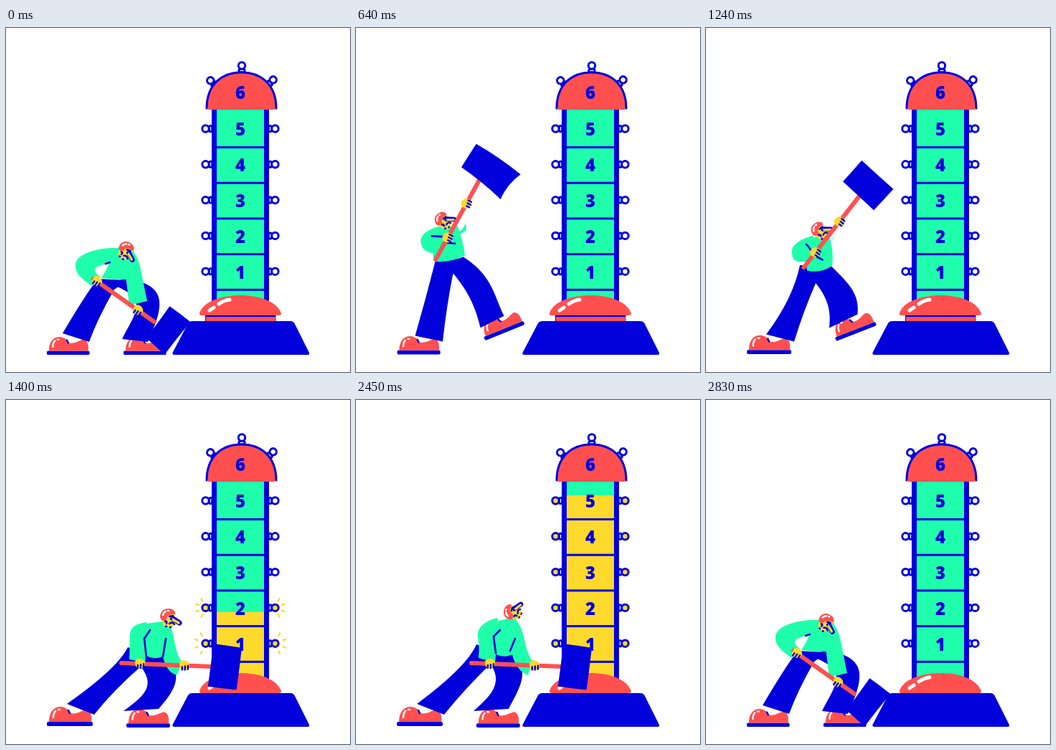
Recreate the animation shown at these times as an HTML page. Size 480 by 480 pixels, loop 2.9 s.

```html
<!DOCTYPE html>
<html lang="en">
<head>
<meta charset="utf-8">
<title>High striker</title>
<style>
  html, body { margin: 0; width: 100%; height: 100%; overflow: hidden; background: #fff; }
  svg { display: block; width: 100%; height: 100%; stroke-linecap: round; stroke-linejoin: round; }
  .b { fill: #0200db; }
  .r { fill: #ff504f; }
  .g { fill: #1fffab; }
  .y { fill: #ffd92b; }
  .line { fill: none; stroke: #0200db; stroke-width: 2.6; }
  .shine { fill: none; stroke: #fff; stroke-width: 2.6; }
  .ray { fill: none; stroke: #ffd92b; stroke-width: 2.2; }
  text { font: 800 24px "Open Sans", sans-serif; text-anchor: middle; fill: #0200db; }
</style>
</head>
<body>
<svg id="stage" viewBox="0 0 480 480"></svg>
<script>
const LOOP = 2900;
const stage = document.getElementById('stage');

function add(parent, tag, attrs = {}) {
  const el = document.createElementNS('http://www.w3.org/2000/svg', tag);
  for (const k in attrs) el.setAttribute(k, attrs[k]);
  parent.appendChild(el);
  return el;
}
const group = (parent, transform = '') => add(parent, 'g', { transform });
const path = (parent, cls, d = '') => add(parent, 'path', { class: cls, d });
const rect = (parent, cls, x, y, width, height, rx = 0) =>
  add(parent, 'rect', { class: cls, x, y, width, height, rx });
const clamp = v => Math.max(0, Math.min(1, v));

// Tower
rect(stage, 'b', 287, 112, 80, 279);
rect(stage, 'g', 294, 114, 66, 277);
const fill = rect(stage, 'y', 294, 391, 66, 0);
for (let i = 0; i < 5; i++) {
  rect(stage, 'b', 294, 165 + i * 49.7, 66, 3);
  add(stage, 'text', { x: 327, y: 150 + i * 50 }).textContent = 5 - i;
}

// Bulbs: [x, y, turn, level that lights it]
const spots = [[329, 62, 0, 118], [292, 80, -45, 118], [366, 79, 45, 118]];
for (let i = 0; i < 5; i++) {
  const y = 140.5 + i * 49.8;
  spots.push([288, y, -90, y + 8], [366, y, 90, y + 8]);
}
const bulbs = spots.map(([x, y, turn, level], i) => {
  const g = group(stage, `translate(${x} ${y}) rotate(${turn})`);
  const glass = add(g, 'circle', { cy: -9.5, r: 4.7, stroke: '#0200db', 'stroke-width': 3 });
  rect(g, 'b', -5.5, -5, 11, 6, 1.5);
  add(path(g, 'shine', 'M-2 -2.5H2'), 'title').remove();
  g.lastChild.style.strokeWidth = 1.3;
  return { glass, level, top: i < 3, rays: path(g, 'ray') };
});

const dome = path(stage, 'r', 'M280 112C280 80 300 62 328.500 62C357 62 377 80 377 112');
dome.setAttribute('stroke', '#0200db');
dome.setAttribute('stroke-width', 3);
rect(stage, 'r', 281.5, 111, 94, 3);
add(stage, 'text', { x: 327, y: 99 }).textContent = 6;

// Strike pad and base
const pad = group(stage);
rect(pad, 'b', 278, 398, 98.5, 11);
rect(pad, 'r', 279, 403, 97, 7);
path(pad, 'r', 'M270 398C275 382 300 373 327 373C355 373 378 382 384 398Q385 401 379 401H274Q269 401 270 398Z');
path(pad, 'shine', 'M284 394L290 390M297 385Q304 380 312 379').style.strokeWidth = 5;
path(stage, 'b', 'M260 409H397Q401 409 403 413L423 453Q424 456 421 456H235Q231 456 233 452L254 412Q256 409 260 409Z');

// Worker
function makeShoe() {
  const g = group(stage);
  rect(g, 'b', 0, -6, 64, 6, 2);
  path(g, 'r', 'M3 -6C3 -20 10 -27 19 -27C26 -27 30 -23 33 -18C42 -16 47 -21 55 -23C62 -22 63 -12 62 -6Z');
  path(g, 'line', 'M30 -22L32 -18');
  path(g, 'shine', 'M9 -12Q9 -18 12 -21M16 -23L18 -23');
  return g;
}
const parts = { shoeL: makeShoe(), shoeR: makeShoe() };
for (const [name, cls] of [['legL', 'b'], ['legR', 'b'], ['torso', 'g'], ['armL', 'g'], ['armR', 'g'], ['folds', 'line']])
  parts[name] = path(stage, cls);

const head = parts.head = group(stage);
path(head, 'y', 'M-8 -1Q-9 11 0 13Q9 13 10 4L10 -6L0 -8Z');
path(head, 'r', 'M-11 -2C-11 -10 -6 -14 1 -14C8 -14 11 -9 10 -6Q3 -7 -1 -3L-3 3Q-10 4 -11 -2Z');
path(head, 'shine', 'M-7 -5Q-6 -9 -3 -10M0 -11L1 -11');
path(head, 'line', 'M7 0L16 6').style.strokeWidth = 7;
const nose = path(head, 'ray', 'M6 1L15 6');
nose.style.strokeWidth = 3.4;
path(head, 'line', 'M2 -3L7 -4M4 0L4.500 1M2 7Q6 4 9 8M-4 4Q-1 3 -2 7M-3 11L-2 11M3 12L4 12');

const hammer = parts.hammer = group(stage);
const shaft = add(hammer, 'line', { x1: 0, y1: 0, y2: 0, stroke: '#ff504f', 'stroke-width': 6 });
parts.block = path(hammer, 'b');
const hands = [0, 1].map(() => {
  const g = group(hammer);
  path(g, 'y', 'M-7 -3Q-5 -8 1 -7Q8 -5 7 1Q5 7 -1 7Q-8 5 -7 -3Z');
  path(g, 'line', 'M-3 2L-3 6M1 1L1 6M5 0L5 5').style.strokeWidth = 2.4;
  return g;
});

// Poses; shoes and head: x y turn scale, hammer: x y turn, grip: length and hand places
const bend = {
  shoeL: '57 456 0 .93', shoeR: '164 456 0 .93', head: '166 311 30 .95',
  legL: 'M128 350Q112 370 79 426L116 438Q128 405 151 365L170 352Z',
  legR: 'M148 358C200 378 182 395 162 434L198 438C222 385 226 358 165 349Z',
  torso: 'M150 307L179 311Q176 340 168 351Q150 351 133 349Q146 330 150 307Z',
  armL: 'M162 307C130 305 95 315 97 332C97 345 110 352 119 360L131 347C120 338 119 333 148 327Z',
  armR: 'M170 309C187 313 187 335 197 381L172 387C170 370 168 355 166 335Z',
  folds: 'M139 329L142 328L145 327M145 327L145 327',
  hammer: '122 350 35.2', grip: '104 6 76',
  block: 'M109 -30Q127 -30 145 -29Q143 0 142 29Q125 27 108 25Q109 0 109 -30Z'
};
const lift = {
  shoeL: '58 456 0 .93', shoeR: '164 456 0 .94', head: '152 278 0 .95',
  legL: 'M131 331Q107 376 82 428L119 439Q130 398 152 350L172 334Z',
  legR: 'M146 334C176 372 180 385 167 434L203 437C205 395 226 355 170 331Z',
  torso: 'M140 283L168 286Q176 305 175 327Q150 336 131 331Q128 300 140 283Z',
  armL: 'M142 283C122 282 112 290 115 304C119 320 128 328 140 337L153 327C148 318 142 310 140 302Z',
  armR: 'M165 285C180 290 178 302 204 303L209 325C190 328 180 322 165 310Z',
  folds: 'M134 298L150 307L151 320M169 296L172 313',
  hammer: '111 345 -20.3', grip: '124 42 104',
  block: 'M130 -32Q150 -31 168 -28Q170 14 157 62Q136 44 109 50Q126 8 130 -32Z'
};
const raise = {
  shoeL: '57 455 0 .94', shoeR: '196 417 -43 .92', head: '92 262 -60 .9',
  legL: 'M92 317Q88 380 83 431L123 436Q122 385 119 338L130 309Z',
  legR: 'M105 326C130 350 150 378 180 403L210 368C180 350 155 335 130 308Z',
  torso: 'M86 278L116 266Q124 288 130 308Q110 322 86 320Q84 300 86 278Z',
  armL: 'M104 269C90 274 66 285 67 294C67 308 84 304 106 290L104 272C100 274 98 276 96 280Z',
  armR: 'M122 285C134 260 128 235 103 224L101 239C116 243 115 255 106 272Z',
  folds: 'M79 283L92 276L104 270M82 303L106 289',
  hammer: '112 301 -100.5', grip: '132 27 74',
  block: 'M129 -29Q149 -28 168 -28Q165 2 164 32Q144 30 124 28Q126 0 129 -29Z'
};
const windup = { ...raise, hammer: '112 301 -106.5', head: '91 263 -64 .9' };
const strike = {
  shoeL: '57 455 0 1', shoeR: '168 457 0 .95', head: '226 305 0 1',
  legL: 'M170 345Q155 375 85 424L123 439Q150 405 188 372L200 354Z',
  legR: 'M180 362C210 395 200 408 164 434L213 431C250 390 240 375 215 352Z',
  torso: 'M182 314L225 308Q234 330 222 356Q208 364 196 357Q190 335 182 314Z',
  armL: 'M196 310C178 313 173 318 173 330C172 345 173 350 172 362L194 366C196 350 196 340 202 325Z',
  armR: 'M222 309C238 318 231 345 246 367L238 384C222 378 219 362 216 340Z',
  folds: 'M201 321L193 333L196 360M223 333L219 358',
  hammer: '161 367 2.3', grip: '127 26 88',
  block: 'M127 -32Q147 -30 167 -28Q165 1 162 31Q142 30 122 28Q125 -2 127 -32Z'
};
const watch = {
  ...strike, head: '219 297 -68 .95',
  legL: 'M168 341Q155 372 85 424L123 439Q150 405 188 368L200 352Z',
  legR: 'M180 358C208 390 194 408 164 434L213 431C226 405 246 378 218 354Z',
  torso: 'M180 312L222 303Q232 325 220 354Q208 361 196 355Q188 335 180 312Z',
  armL: 'M197 304C178 309 169 318 170 330C172 345 172 348 171 360L194 366C196 350 196 340 202 322Z',
  armR: 'M218 303C238 316 232 345 246 364L240 384C225 378 217 362 216 340Z',
  folds: 'M201 321L192 330L195 353M222 333L215 350'
};
const keys = [[0, bend], [50, bend], [400, lift], [870, raise], [1140, windup], [1340, strike],
  [1430, strike], [1700, watch], [2630, watch], [2830, bend], [LOOP, bend]];

// Moments at which the drawing changes
const run = (from, to) => Array.from({ length: (to - from) / 30 + 1 }, (_, i) => from + i * 30);
const ticks = [0, 100, 200, 300, 400, 470, 540, 640, 740, 870, 940, 1040, 1140, 1240,
  ...run(1310, 1820), 1920, 2020, 2120, 2220, 2320, ...run(2390, 2690), 2760, 2830];

function mix(a, b, k) {
  const to = b.match(/-?[\d.]+/g);
  let i = 0;
  return a.replace(/-?[\d.]+/g, n => (+n + (to[i++] - n) * k).toFixed(2));
}

function drawWorker(t) {
  const i = keys.findIndex(([end], n) => n && t < end);
  const [start, from] = keys[i - 1], [end, to] = keys[i];
  const k = (t - start) / (end - start);
  for (const name in from) {
    const v = mix(from[name], to[name], k);
    const n = v.split(' ');
    if (name === 'grip') {
      shaft.setAttribute('x2', n[0]);
      hands.forEach((h, j) => h.setAttribute('transform', `translate(${n[j + 1]} 0)`));
    } else if (v[0] === 'M') {
      parts[name].setAttribute('d', v);
    } else {
      parts[name].setAttribute('transform', `translate(${n[0]} ${n[1]}) rotate(${n[2]}) scale(${n[3] || 1})`);
    }
  }
}

const riseAt = t => 113 + 277 * (1 - clamp((t - 1340) / 420)) ** 2.7;
const levelAt = t => t < 2320 ? riseAt(t) : Math.min(391, 113 + 20 * (Math.max(0, t - 2360) / 90) ** 2);
const litAt = y => 1340 + 420 * (1 - ((y - 113) / 277) ** (1 / 2.7));

function rayPath(a, b) {
  return [-65, -22, 22, 65].map(deg => {
    const s = Math.sin(deg * Math.PI / 180), c = Math.cos(deg * Math.PI / 180);
    return `M${s * a} ${-9.5 - c * a}L${s * b} ${-9.5 - c * b}`;
  }).join('');
}

function drawTower(t) {
  const level = levelAt(t);
  fill.setAttribute('y', level);
  fill.setAttribute('height', 391 - level);
  pad.setAttribute('transform', `translate(0 ${t >= 1340 ? 8 : 0})`);
  for (const b of bulbs) {
    const lit = t >= 1340 && level <= b.level && !(b.top && t >= 2320);
    b.glass.setAttribute('fill', lit ? '#ffd92b' : '#fff');
    const age = t - litAt(b.level);
    const flash = b.top && (t === 1920 || t === 2120);
    const show = lit && t < 2320 && (flash || age < (b.top ? 145 : 110));
    const r = flash ? 14 : 10 + clamp(age / 110) * 6;
    b.rays.setAttribute('d', show ? rayPath(r, r + (b.top ? 7 : 4)) : '');
  }
}

let shown = -1;
function frame(now) {
  const time = now % LOOP;
  const t = ticks.filter(s => s <= time).pop();
  if (t !== shown) {
    shown = t;
    drawWorker(t);
    drawTower(t);
  }
  requestAnimationFrame(frame);
}
frame(0);
</script>
</body>
</html>
```
